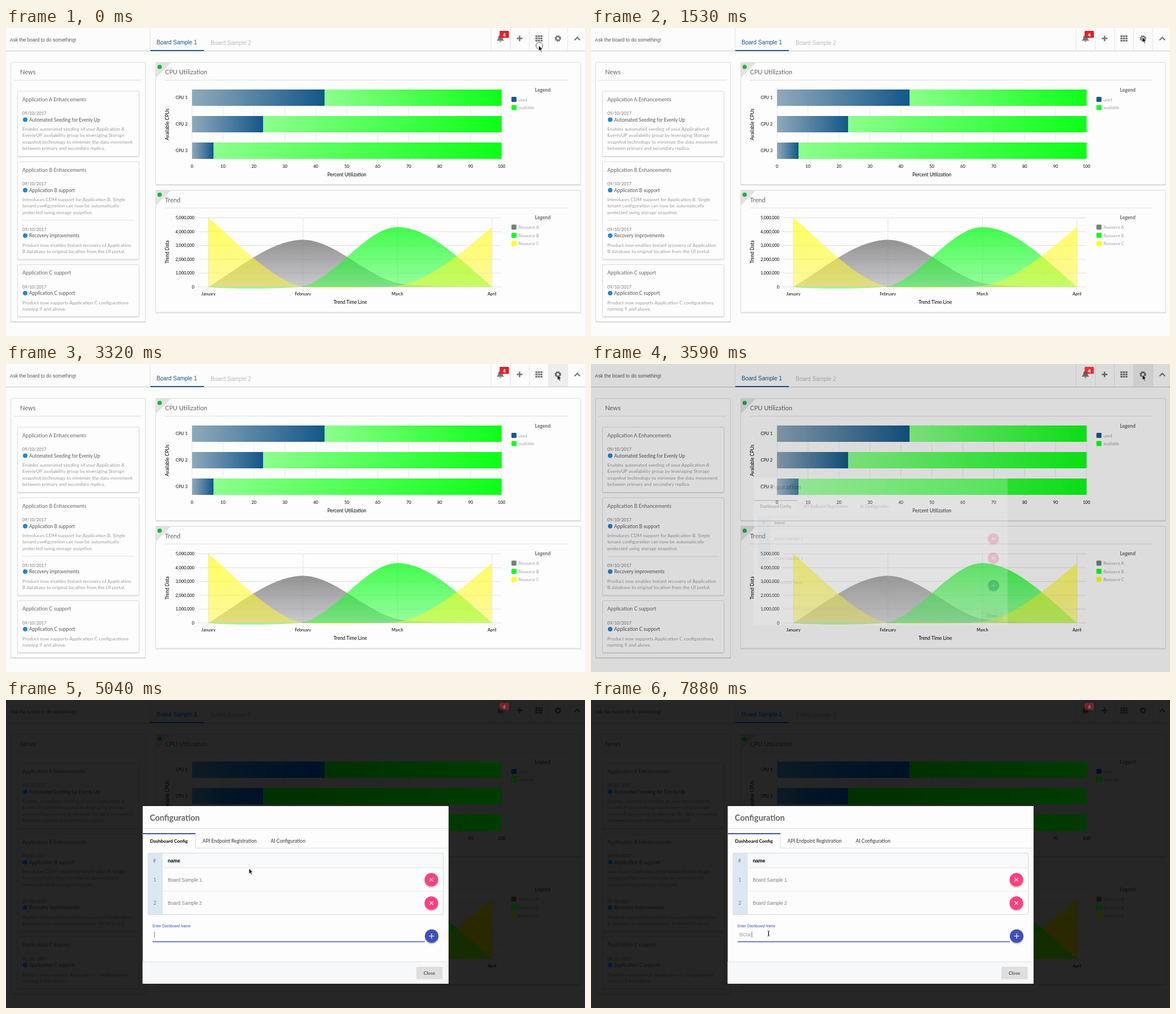
Recreate the animation shown at these times as an HTML page. Size 1027 px wide and 546 px high, loop 8 s.

```html
<!DOCTYPE html>
<html lang="en">
<head>
<meta charset="utf-8">
<title>Dashboard configuration</title>
<style>
html, body { margin: 0; width: 100%; height: 100%; overflow: hidden; background: #fcfcfc; }
svg { position: absolute; left: 0; top: 0; width: 1027px; height: 546px; font: 8.5px Lato, sans-serif; }
.sans { font-family: "Liberation Sans", Arial, sans-serif; }
.mid { text-anchor: middle; }
.end { text-anchor: end; }
.bold { font-weight: 700; }
.title { font-size: 11.1px; fill: #666; }
.tick { font-size: 7.4px; }
</style>
</head>
<body>
<svg id="page" viewBox="0 0 1027 546"></svg>
<svg id="top" viewBox="0 0 1027 546"></svg>
<script>
const $ = id => document.getElementById(id);
const range = (n, f) => Array.from({ length: n }, (_, i) => f(i)).join('');
const text = (x, y, s, attrs = '') => `<text x="${x}" y="${y}" ${attrs}>${s}</text>`;
const rect = (x, y, w, h, fill, attrs = '') =>
  `<rect x="${x}" y="${y}" width="${w}" height="${h}" fill="${fill}" ${attrs}/>`;
const line = (x1, y1, x2, y2, color = '#ddd', w = 1) =>
  `<path d="M${x1},${y1}L${x2},${y2}" stroke="${color}" stroke-width="${w}"/>`;
const dot = (x, y, r, fill) => `<circle cx="${x}" cy="${y}" r="${r}" fill="${fill}"/>`;
const fade = (id, dir, from, to, a = 1, b = 1) => `<linearGradient id="${id}" ${dir}>
  <stop stop-color="${from}" stop-opacity="${a}"/><stop offset="1" stop-color="${to}" stop-opacity="${b}"/></linearGradient>`;
const card = (x, y, w, h) =>
  rect(x, y + 1.2, w, h, 'none', 'rx="1.5" stroke="#d5d5d5"') +
  rect(x, y, w, h, '#fdfdfd', 'rx="1.5" stroke="#dadada"');

function header() {
  const icon = '#777';
  return line(0, 40.5, 1027, 40.5, '#d2d2d2') + line(0, 41.5, 1027, 41.5, '#eee') +
    line(255.5, 0, 255.5, 40, '#e2e2e2') +
    range(5, i => line(860.5 + 34 * i, 0, 860.5 + 34 * i, 40, '#e6e6e6')) +
    rect(963, 0, 33, 40, '#ededed', 'id="hover"') +
    text(7, 23.5, 'Ask the board to do something!', 'class="sans" font-size="8.5" fill="#555"') +
    text(267, 29, 'Board Sample 1', 'class="sans" font-size="10" fill="#17528a"') +
    text(363, 29.5, 'Board Sample 2', 'class="sans" font-size="10" fill="#bbb"') +
    rect(256, 39, 95, 2, '#1b588c') +
    `<path fill="${icon}" d="M870.5,22.5q2.5,-2 2.5,-5.5q0,-4 4,-4.3q4,.3 4,4.3q0,3.500 2.500,5.500zM875,23.300h4q-2,3 -4,0z"/>` +
    line(906, 18.500, 916, 18.500, icon, 2.6) + line(911, 13.500, 911, 23.500, icon, 2.6) +
    range(9, i => rect(939 + i % 3 * 4.5, 13 + (i / 3 | 0) * 4, 3.6, 3, icon)) +
    `<g id="gear" fill="none" stroke="${icon}"><circle cx="979" cy="18.500" r="3.500" stroke-width="2.4"/>
     <circle cx="979" cy="18.500" r="5" stroke-width="1.800" stroke-dasharray="1.963"/></g>` +
    `<path d="M1008.500,21.500l4.800,-4.800l4.800,4.800" fill="none" stroke="${icon}" stroke-width="2.300"/>`;
}

function newsItem(y, title, lines) {
  return text(29, y + 3, '09/10/2017', 'font-size="7.7" fill="#777"') +
    dot(34, y + 11.5, 4, '#1e87d6') + text(41, y + 14.5, title, 'fill="#555"') +
    lines.map((s, i) => text(29, y + 31 + i * 11.4, s, 'font-size="8.45" fill="#9b9b9b"')).join('');
}

function news() {
  const heading = (y, s) => text(29, y, s, 'font-size="9.05" fill="#666"');
  return card(8.5, 61, 239, 459.5) + text(25, 82, 'News', 'class="title"') + line(13, 92.5, 240, 92.5) +
    card(20.5, 112, 215.5, 115.5) + card(20.5, 237, 215.5, 173) + card(20.5, 419.5, 215.5, 92) +
    heading(129.5, 'Application A Enhancements') +
    newsItem(151, 'Automated Seeding for Evenly Up', ['Enables automated seeding of your Application A',
      'EvenlyUP availability group by leveraging Storage', 'snapshot technology to minimize the data movement',
      'between primary and secondary replica.']) +
    heading(254.500, 'Application B Enhancements') +
    newsItem(276, 'Application B support', ['Introduces CDM support for Application B. Single',
      'tenant configuration can now be automatically', 'protected using storage snapshot.']) +
    line(29, 341, 227, 341) +
    newsItem(356.5, 'Recovery improvements', ['Product now enables Instant recovery of Application',
      'B database to original location from the UI portal.']) +
    heading(437, 'Application C support') +
    newsItem(458.5, 'Application C support', ['Product now supports Application C configurations',
      'running 9 and above.']);
}

const chartCard = (y, h, title) => card(265.500, y, 754, h) +
  `<path d="M265,${y}h28l-28,28z" fill="#e2e2e2"/>` + dot(272.5, y + 8, 3.8, '#1fb043') +
  text(282, y + 21, title, 'class="title"') + line(282, y + 31.5, 996, y + 31.5);

const legend = (y, items) => text(952, y, 'Legend', 'class="mid bold" font-size="8.6" fill="#666"') +
  items.map(([s, c], i) => rect(896.500, y + 9.5 + 14.5 * i, 9, 9, c, 'rx="1.500"') +
    text(909, y + 17 + 14.5 * i, s, 'class="tick" fill="#a0a0a0"')).join('');

function cpuChart() {
  return chartCard(61, 216.5, 'CPU Utilization') +
    range(11, i => line(330 + 54.9 * i, 105, 330 + 54.9 * i, 235, '#e8e8e8') +
      text(330 + 54.9 * i, 247.500, i * 10, 'class="tick mid"')) +
    [565, 456, 368].map((x, i) => {
      const y = 109 + 47 * i;
      return rect(330, y, x - 330, 29, 'url(#used)') + rect(x, y, 879 - x, 29, 'url(#free)') +
        text(322, y + 17, `CPU ${i + 1}`, 'class="tick end"');
    }).join('') +
    text(604.5, 262.500, 'Percent Utilization', 'class="mid"') +
    text(0, 0, 'Available CPUs', 'class="mid" transform="translate(289 171) rotate(-90)"') +
    legend(112.500, [['used', '#145a8a'], ['available', '#10ff20']]);
}

function trendChart() {
  const months = ['January', 'February', 'March', 'April'];
  const area = (d, id) => `<path d="${d}" fill="url(#${id})"/>`;
  return chartCard(287.5, 216.5, 'Trend') +
    range(6, i => {
      const y = 459 - 24.5 * i;
      return line(341, y, 879, y, '#e0e0e0') +
        text(334, y + 2.7, (i * 1e6).toLocaleString('en-US'), 'class="tick end"');
    }) +
    months.map((m, i) => {
      const x = 359 + 167.67 * i;
      return line(x, 336, x, 464, '#e4e4e4') + text(x, 474, m, 'class="tick mid"');
    }).join('') +
    area('M359,459C415,425 470,375.5 526.700,375.5C582,375.5 640,440 694,452C730,459 800,459 862,459z', 'a') +
    area('M359,459C375,463 490,463.5 526.700,458C582,445 640,353 694,353C750,353 806,410 862,459z', 'b') +
    area('M359,459V336.500C415,385 470,445 526.700,459.500C580,463 640,462 694,457C750,449 806,400 862,353V459z', 'c') +
    text(610.5, 489, 'Trend Time Line', 'class="mid"') +
    text(0, 0, 'Trend Data', 'class="mid" transform="translate(289 397) rotate(-90)"') +
    legend(339, [['Resource A', '#7d7d7d'], ['Resource B', '#10ff20'], ['Resource C', '#ffff20']]);
}

const roundButton = (x, y, fill, angle) => dot(x, y + 1.8, 12.5, 'rgba(0,0,0,.18)') + dot(x, y, 12, fill) +
  `<path d="M-4.500,0h9M0,-4.500v9" stroke="#fff" stroke-width="1.200" transform="translate(${x} ${y}) rotate(${angle})"/>`;

function modal() {
  const blue = '#3f51b5', row = (y, n) =>
    text(264, y + 3, n, 'class="mid" fill="#6d7c88"') +
    text(287, y + 3, `Board Sample ${n}`, 'class="sans" font-size="8.45" fill="#7c7c7c"') +
    roundButton(754.5, y, '#ff4081', 45);
  return rect(242.500, 188, 542.5, 315, '#fdfdfd', 'rx="1"') +
    text(255, 213.5, 'Configuration', 'class="bold" font-size="14.5" fill="#666"') +
    line(243, 227.500, 785, 227.500, '#e2e2e2') +
    line(336, 262.500, 785, 262.500) + line(336.500, 237, 336.500, 262.500) + rect(243, 236, 93, 2, blue) +
    text(255.500, 253, 'Dashboard Config', 'class="bold" font-size="8.4"') +
    text(348.500, 253, 'API Endpoint Registration', 'fill="#333"') + text(469.5, 253, 'AI Configuration', 'fill="#333"') +
    rect(252, 271.500, 523.5, 109, '#fcfcfc', 'rx="1.500"') + rect(252, 271.500, 523.5, 26, '#f8f9fa') +
    rect(252, 271.500, 26, 109, '#dbe8f3') +
    line(252, 297.500, 775, 297.500, '#e4e7ea') + line(278, 339, 775, 339, '#e4e7ea') +
    rect(252, 271.500, 523.5, 109, 'none', 'rx="1.500" stroke="#d4d9de"') +
    text(263.5, 287.500, '#', 'class="mid" fill="#6d7c88"') +
    text(287, 287.500, 'name', 'class="sans bold" font-size="8.4"') +
    row(318.5, 1) + row(360, 2) +
    text(260, 0, 'Enter Dashboard Name', 'id="label" class="sans"') +
    `<g id="underline">${line(260, 428.5, 743, 428.5, blue, 1.700)}</g>` +
    text(263, 419, '', 'id="typed" class="sans" font-size="9.4" fill="#999"') +
    rect(263, 410.5, 0.8, 10.5, '#666', 'id="caret"') +
    roundButton(755, 418.5, blue, 0) +
    rect(242.500, 464, 542.5, 39, '#f7f8f9') + line(242.500, 464, 785, 464, '#e0e0e0') +
    rect(728, 473, 46.500, 22, '#dedede', 'rx="1"') +
    text(751, 487, 'Close', 'class="mid bold" font-size="8.4" fill="#555"');
}

$('page').innerHTML = '<defs>' + fade('used', '', '#8fa9bb', '#13578a') + fade('free', '', '#8cff8c', '#0cff18') +
  fade('a', 'x2="0" y2="1"', '#7f7f7f', '#8b8b90', 0.85, 0.45) +
  fade('b', 'x2="0" y2="1"', '#0cfa1c', '#20ff30', 0.78, 0.45) +
  fade('c', 'x2="0" y2="1"', '#ffff28', '#fff628', 0.75, 0.45) + '</defs>' +
  rect(0, 0, 1027, 546, '#fcfcfc') + header() + news() + cpuChart() + trendChart();

$('top').innerHTML =
  `<g id="badge">${rect(875.5, 5, 16.500, 12.5, '#d9232b', 'rx="1.500"')}
   ${text(883.8, 14.500, '4', 'class="sans mid bold" font-size="9" fill="#fff"')}</g>
  <g id="modal">${modal()}</g>
  <circle id="click" cx="946" cy="31.500" r="6" fill="rgba(255,255,255,.5)" stroke="#444" stroke-width=".9"/>
  <path id="arrow" d="M0,0v9.700l2.200,-2l1.700,3.600l1.600,-.7l-1.700,-3.500h3z" stroke="#fff" stroke-width=".8"/>
  <path id="beam" d="M-2,-4.500q2,0 2,1.500v6q0,1.500 -2,1.500M2,-4.500q-2,0 -2,1.500v6q0,1.500 2,1.500M-1,1.500h2" fill="none" stroke="#222" stroke-width=".9"/>`;

// Pointer moves: first step, last step, step count, target x, y
const moves = [
  [470, 470, 1, 944, 27], [650, 830, 3, 943, 20], [1090, 1530, 6, 978, 16], [2070, 2330, 4, 978, 19],
  [4330, 4330, 1, 885, 55], [4560, 4560, 1, 543, 219], [4890, 4890, 1, 485, 249],
  [5040, 5130, 2, 377, 348], [5300, 5740, 6, 318, 412], [5920, 6180, 4, 315, 414]
];
const blinks = [4090, 4560, 4890, 5300, 5920, 6360, 6900];
const keys = [7350, 7520, 7700, 7880];
const passed = (list, t) => list.filter(k => t >= k).length;

function pointer(t) {
  let x = 945, y = 31;
  for (const [start, end, n, tx, ty] of moves) {
    if (t < start) break;
    const step = t >= end ? n : Math.floor((t - start) / (end - start) * (n - 1)) + 1;
    x += (tx - x) * step / n;
    y += (ty - y) * step / n;
  }
  return `translate(${x} ${y})`;
}

const set = (id, attrs) => { for (const k in attrs) $(id).setAttribute(k, attrs[k]); };
const show = (id, on) => set(id, { visibility: on ? 'inherit' : 'hidden' });

function draw(t) {
  const phase = passed([3590, 3850, 4090], t);
  const filter = ['none', 'brightness(.87)', 'brightness(.15) saturate(3)'][Math.min(phase, 2)];
  if ($('page').style.filter !== filter) $('page').style.filter = filter;
  set('badge', { opacity: [1, 0.88, 0.45, 0.45][phase] });

  const hover = t < 1890 || t >= 4330 ? 0 : Math.min(1, (t - 1700) / 600);
  set('hover', { opacity: hover });
  set('gear', { stroke: hover ? '#666' : '#777' });

  const [scale, cy, opacity] = [[0.83, 332, 0], [0.83, 332, 0.2], [0.997, 345.5, 1], [1, 345.5, 1]][phase];
  set('modal', { opacity, transform: `translate(514 ${cy}) scale(${scale}) translate(-514 -345.5)` });

  const focused = phase === 3;
  set('label', focused
    ? { y: 403.2, 'font-size': 6.4, fill: '#3f51b5' }
    : { y: 415.7, 'font-size': 8.4, fill: '#777' });
  show('underline', focused);
  $('typed').textContent = 'BOar'.slice(0, passed(keys, t));
  set('caret', { x: 263 + $('typed').getComputedTextLength() });
  show('caret', passed(blinks, t) % 2);

  const overInput = t >= 5740;
  show('click', t < 90);
  show('arrow', !overInput);
  show('beam', overInput);
  set(overInput ? 'beam' : 'arrow', { transform: pointer(t) });
}

const began = performance.now();
function tick() {
  draw((performance.now() - began) % 8000);
  requestAnimationFrame(tick);
}
tick();
</script>
</body>
</html>
```
